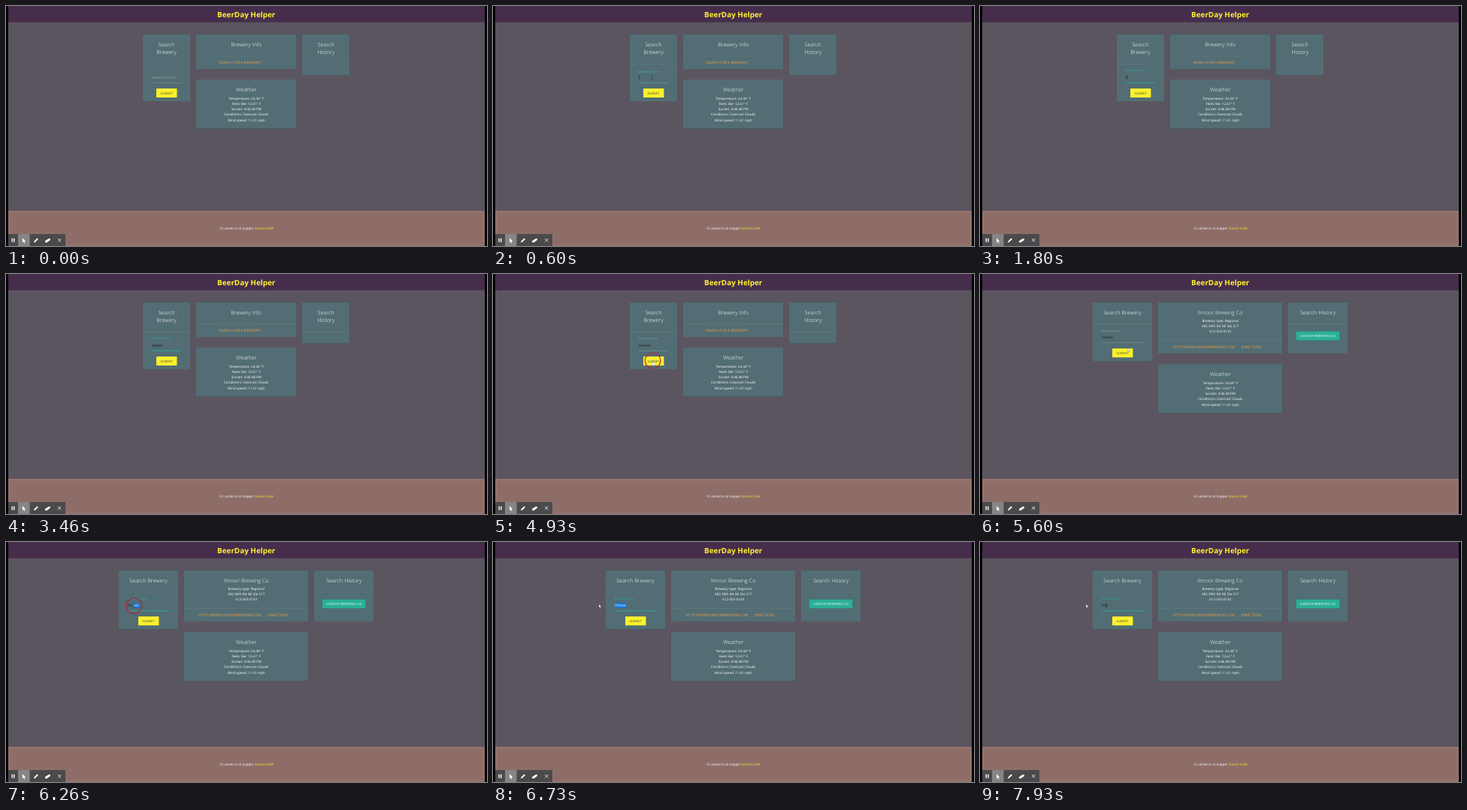
Animation, 640 px wide and 320 px high, one loop 8 s. Source, as an HTML page:

```html
<!DOCTYPE html>
<html lang="en">
<head>
<meta charset="utf-8">
<title>BeerDay Helper</title>
<style>
  html, body { margin: 0; width: 100%; height: 100%; overflow: hidden; background: #000; }
  svg { display: block; width: 100%; height: 100%; }
  text { font: 4.55px "Open Sans", "Noto Sans", sans-serif; fill: #fff; text-rendering: geometricPrecision; white-space: pre; }
  .middle { text-anchor: middle; }
  .brand { font-size: 9.9px; font-weight: 700; fill: #fff230; }
  .title { font-size: 7.25px; font-weight: 300; }
  .link { font-size: 4.77px; fill: #f0a04b; }
  .button { font-size: 4.3px; letter-spacing: .17px; }
  .dark { fill: #4d4d28; }
  .value { font-size: 4.95px; fill: #15191c; }
  .code { font-style: italic; fill: #fff230; }
  .card { fill: #526d74; filter: drop-shadow(0 .7px .6px rgba(0, 0, 0, .35)); }
  .raised { filter: drop-shadow(0 .6px .5px rgba(0, 0, 0, .3)); }
</style>
</head>
<body>
<svg id="stage" viewBox="0 0 640 320"></svg>
<script>
const LOOP = 8000;
const WORD = "Ilmoor";
const KEYS = [1800, 2060, 2130, 2400, 2600, 2930];
const NEW_WORD = "Ha";
const NEW_KEYS = [7800, 7930];
const FOCUS = 470, SUBMIT = 4800, RESULT = 5000, DRAG = 6060, RELEASE = 6730;
const BLINK = 530;

// Pointer stops: time, x, y, shape used from that time on
const PATH = [
  [60, 300, 200, "arrow"], [400, 212, 95, "beam"], [4530, 212, 95, "beam"],
  [4700, 212.5, 113, "hand"], [4800, 212.5, 115.5, "hand"], [5200, 213, 115.5, "arrow"],
  [5330, 211, 111, "arrow"], [5400, 208, 107, "arrow"], [5860, 177.5, 85.5, "beam"],
  [DRAG, 177.5, 85.5, "beam"], [6700, 141, 83, "arrow"]
];
const CLICKS = [[400, 600], [SUBMIT, 5130], [DRAG, RELEASE]];

const FIELDS = {
  before: { x: 194, y: 95, width: 39.5 },
  after: { x: 162, y: 84.5, width: 56 }
};

// Text placed by the vertical centre of its capitals
const label = (x, y, size, text, cls = "") =>
  `<text x="${x}" y="${y + size * .36}" class="${cls}">${text}</text>`;
const centred = (x, y, size, text, cls = "") => label(x, y, size, text, cls + " middle");
const rect = (x, y, w, h, fill, extra = "") =>
  `<rect x="${x}" y="${y}" width="${w}" height="${h}" fill="${fill}" ${extra}/>`;
const titles = (x, lines) => lines.map((s, i) => centred(x, 51 + i * 10.7, 7.25, s, "title")).join("");
const lines = (x, y, list) => list.map((s, i) => centred(x, y + i * 7.25, 4.55, s)).join("");

function card(x, y, w, h, divider) {
  return `<rect x="${x}" y="${y}" width="${w}" height="${h}" rx=".6" class="card"/>` +
    (divider ? rect(x, divider, w, .4, "#a0a0a0", 'opacity=".4"') : "");
}
function button(x, y, w, text, fill, cls = "") {
  return rect(x, y, w, 12, fill, 'rx=".6" class="raised"') +
    centred(x + w / 2, y + 6, 4.3, text, "button " + cls);
}
function weather(x, y, w) {
  return card(x, y, w, 65.5) + centred(x + w / 2, y + 13.7, 7.25, "Weather", "title") +
    lines(x + w / 2, y + 25, ["Temperature: 24.44° F", "Feels like: 12.61° F",
      "Sunset: 4:46:48 PM", "Conditions: Overcast Clouds", "Wind speed: 11.41 mph"]);
}

const beforeLayout =
  card(182, 37.5, 63, 89.5, 77) + titles(213.5, ["Search", "Brewery"]) +
  button(200, 110, 27.5, "SUBMIT", "#faf02f", "dark") +
  card(253, 37.5, 133.5, 46.5, 66) + titles(319.7, ["Brewery Info"]) +
  label(283, 75.3, 4.77, "SEARCH FOR A BREWERY!", "link") +
  weather(253, 98, 133.5) +
  card(394, 37.5, 63.3, 55, 77) + titles(425.7, ["Search", "History"]);

const afterLayout =
  card(150, 37.5, 79, 79, 66) + titles(189.5, ["Search Brewery"]) +
  button(176, 99.3, 27.5, "SUBMIT", "#faf02f", "dark") +
  card(237, 37.5, 165.5, 68.5, 88) + titles(319.7, [WORD + " Brewing Co"]) +
  lines(319.7, 62, ["Brewery type: Regional", "482 39th Rd NE Ste 517", "612-555-0143"]) +
  label(256.5, 97.3, 4.77, `HTTP://WWW.${WORD.toUpperCase()}BREWING.COM`, "link") +
  label(347.7, 97.3, 4.77, "DIRECTIONS", "link") +
  weather(237, 120, 165.5) +
  card(410, 37.5, 79.5, 68.5, 66) + titles(449.7, ["Search History"]) +
  button(420.7, 76.5, 57.8, WORD.toUpperCase() + " BREWING CO", "#2bb096");

const toolbar = `
  ${rect(3, 304, 76, 16, "#4a4a4c")}${rect(16, 304, 15.5, 16, "#858585")}
  <path d="M8.2 309.7v5M10.8 309.7v5" stroke="#fff" stroke-width="1.4"/>
  <path d="M22 309.3v6l1.4-1.2 1 2.2 1-.5-1-2.1h1.9z" fill="#fff"/>
  <path d="M37 315.4l.6-2 3.8-3.8 1.4 1.4-3.8 3.8z" fill="#fff"/>
  <path d="M52 313.2l4.5-3 2.4-.2v2l-4.4 3.2H52z" fill="#fff"/>
  <path d="M69 310l4.4 4.4M73.4 310L69 314.4" stroke="#fff" stroke-width=".8"/>`;

document.getElementById("stage").innerHTML = `
  ${rect(0, 0, 640, 320, "#000")}
  ${rect(3, 0, 634, 320, "#5b5560")}
  ${rect(3, 0, 634, 21.5, "#462d4c", 'class="raised"')}
  ${centred(319.7, 11, 9.9, "BeerDay Helper", "brand")}
  ${rect(3, 273, 634, 47, "#94716c")}${rect(6, 276.5, 628, 40.5, "#8e6d68")}
  <text x="320" y="298.3" class="middle">© Lanterns at Supper <tspan class="code">Source Code</tspan></text>
  <g id="before">${beforeLayout}</g>
  <g id="after">${afterLayout}</g>
  <g id="field">
    <rect id="underline" x="0"/>
    <text id="hint">Brewery Name</text>
    <rect id="selection" y="-3.4" height="6.8" fill="#1677d8"/>
    <text id="value" class="value" y="1.8"><tspan id="plain"></tspan><tspan id="marked" fill="#fff"></tspan></text>
    <rect id="caret" y="-3" width=".5" height="6" fill="#111"/>
  </g>
  ${toolbar}
  <g id="pointer">
    <circle id="ring" r="10.3" fill="none" stroke="#b5213c" stroke-width="1.1"/>
    <path id="arrow" d="M0 0v4.6l1.1-1 .8 1.8.8-.4-.8-1.7h1.5z" fill="#fff" stroke="#222" stroke-width=".25"/>
    <path id="beam" d="M-.8-2.7H.8M0-2.7v5.4M-.8 2.7H.8" stroke="#222" stroke-width=".35"/>
    <path id="hand" d="M-.5.3q.5-.6 1 0v2.2l2.2.6q.6.3.4 1.2l-.5 2H-.2l-1.7-2.5q0-.7.7-.5l.7.6z" fill="#fff" stroke="#333" stroke-width=".25"/>
  </g>`;

const el = Object.fromEntries([...document.querySelectorAll("#stage [id]")].map(e => [e.id, e]));
const show = (e, on) => { e.style.display = on ? "" : "none"; };
const set = (e, attrs) => { for (const k in attrs) e.setAttribute(k, attrs[k]); };
const ramp = (t, a, b) => Math.min(1, Math.max(0, (t - a) / (b - a)));
const ease = p => p < .5 ? 2 * p * p : 1 - 2 * (1 - p) ** 2;
const pressed = (t, keys) => keys.filter(k => k <= t);

function pointerAt(t) {
  const i = Math.max(0, PATH.findLastIndex(p => p[0] <= t));
  const [start, x, y, shape] = PATH[i];
  const [end, nextX, nextY] = PATH[i + 1] || [LOOP, x, y];
  const p = ease(ramp(t, start, end));
  return { x: x + (nextX - x) * p, y: y + (nextY - y) * p, shape };
}

function drawField(t, pointer) {
  const field = t < RESULT ? FIELDS.before : FIELDS.after;
  const retyped = t >= NEW_KEYS[0];
  const keys = pressed(t, retyped ? NEW_KEYS : KEYS);
  const value = (retyped ? NEW_WORD : WORD).slice(0, keys.length);
  const focus = ramp(t, FOCUS, FOCUS + 200) - ramp(t, SUBMIT, RESULT) + ramp(t, DRAG, DRAG + 200);
  const lift = ease(ramp(t, FOCUS, FOCUS + 200));
  const tint = `color-mix(in srgb, #25b3a3 ${focus * 100}%, #969fa3)`;

  set(el.field, { transform: `translate(${field.x} ${field.y})` });
  set(el.underline, { y: 7.1 - focus * .2, width: field.width, height: .4 + focus * .4 });
  el.underline.style.fill = el.hint.style.fill = tint;
  el.hint.style.fontSize = 4.65 - lift * .95 + "px";
  set(el.hint, { y: 1.7 - lift * 9.6 });

  el.plain.textContent = value;
  el.marked.textContent = "";
  const width = value ? el.value.getComputedTextLength() : 0;
  const selecting = t >= DRAG && !retyped;
  show(el.selection, selecting);
  if (selecting) {
    const edge = i => el.value.getStartPositionOfChar(i).x;
    const middle = i => (edge(i) + el.value.getEndPositionOfChar(i).x) / 2;
    let first = 0;
    while (first < value.length && middle(first) < pointer.x - field.x) first++;
    const left = first < value.length ? edge(first) : width;
    set(el.selection, { x: left, width: Math.max(0, width - left) });
    el.plain.textContent = value.slice(0, first);
    el.marked.textContent = value.slice(first);
  }

  const lastKey = keys.length ? keys[keys.length - 1] : FOCUS;
  const typing = t >= FOCUS && t < SUBMIT || retyped;
  show(el.caret, typing && Math.floor((t - lastKey) / BLINK) % 2 === 0);
  set(el.caret, { x: width + .2 });
}

function draw(t) {
  const pointer = pointerAt(t);
  show(el.before, t < RESULT);
  show(el.after, t >= RESULT);
  drawField(t, pointer);
  show(el.pointer, t >= 60 && t < KEYS[0] || t >= 4130);
  set(el.pointer, { transform: `translate(${pointer.x} ${pointer.y})` });
  for (const shape of ["arrow", "beam", "hand"]) show(el[shape], shape === pointer.shape);
  show(el.ring, CLICKS.some(([a, b]) => t >= a && t < b));
}

const start = performance.now();
function tick() {
  draw((performance.now() - start) % LOOP);
  requestAnimationFrame(tick);
}
tick();
</script>
</body>
</html>
```
